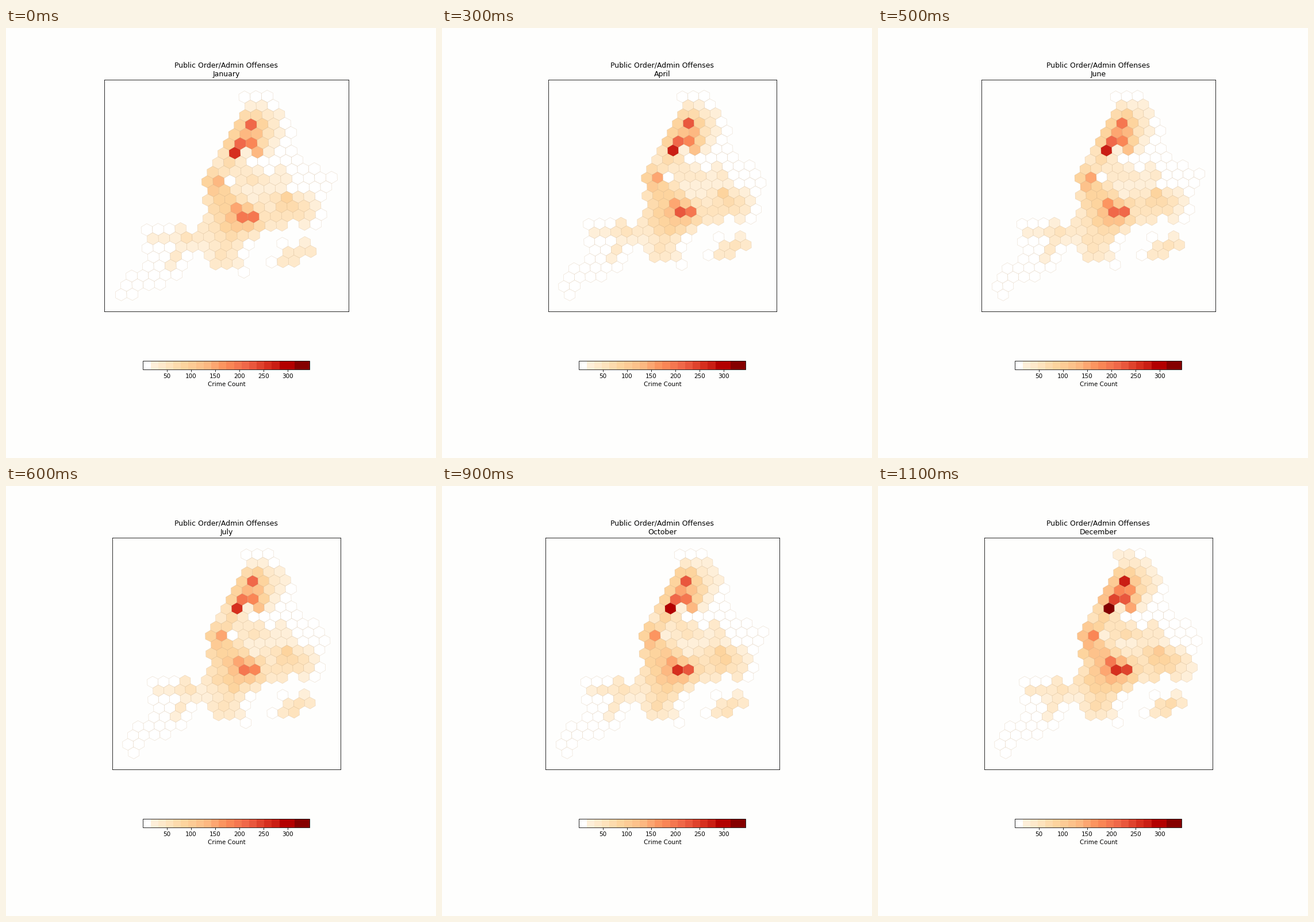
Animation, 748 px wide and 748 px high, one loop 1.2 s. Source, as a matplotlib script:

```python
import numpy as np
import matplotlib.pyplot as plt
from matplotlib.animation import FuncAnimation
from matplotlib.collections import PolyCollection
from matplotlib.colors import ListedColormap
from matplotlib.path import Path

MONTHS = ("January February March April May June July August "
          "September October November December").split()
PAPER = "#fefefd"

# Coastlines in lattice units (column, row)
MAINLAND = [(11.7, -.5), (12.2, 1), (8.2, 9), (8.2, 13.2), (6.7, 16.2),
            (8.2, 17), (8.7, 18.3), (11, 18.4), (11.2, 19.3), (11.8, 19.3),
            (11.8, 17), (12.9, 14.6), (15.4, 14.5), (16, 13.4), (16.6, 14.5),
            (18.3, 14.5), (18.9, 13), (18.9, 11), (19.3, 10), (18.9, 9),
            (18.4, 8), (16.7, 7), (16.3, 4), (14.3, -.5)]
ISLAND = [(2.7, 13.7), (6.3, 13.7), (6.8, 15), (6.8, 17.2), (5.7, 19.2),
          (4.3, 20.1), (1.9, 20.8), (1.2, 22.3), (.8, 22.3), (.3, 21),
          (1.2, 18.7), (2.7, 18.5)]
SPIT = [(14.7, 15.7), (15.3, 15.7), (15.6, 16.4), (16.4, 16.4), (16.7, 15.7),
        (17.3, 15.7), (17.9, 17.2), (16.5, 18.3), (13.6, 18.3), (14.7, 17)]
EAST_CAPE, SOUTH_CAPE = (19.5, 9), (1, 22)   # reported only in some months

# Density of reports: column, row, height, width
HILLS = [(12.5, 4, 95, 1.7), (9.5, 9.2, 100, 1.25), (12.7, 8.6, 55, 1),
         (10.6, 13.6, 95, 1.9), (15.9, 12, 72, 1.5), (9.5, 17.5, 35, .8),
         (16.8, 17.6, 65, .8), (6.2, 15, 50, .8),
         (14.8, 7, -60, 1.1), (16.7, 9.5, -40, .9)]
# Column, row, height
PEAKS = [(11, 6, 230), (11.5, 5, 115), (12.5, 5, 100), (12.5, 3, 135),
         (13, 6, 100), (9.5, 9, 65), (11, 12, 60), (11.5, 13, 115),
         (12.5, 13, 130), (15.5, 11, 30), (15.2, 8.4, 85), (4, 15, 45),
         (5.3, 17.5, 45), (15.2, 17.6, 45)]
HOLLOWS = [(12, 6, -95), (12.6, 7, -65), (10.5, 9, -85), (12.4, 10, -45),
           (12, 16.5, -40)]
BUMPS = np.array(HILLS + [(*p, .5) for p in PEAKS] + [(*h, .6) for h in HOLLOWS])

GRID = np.array([(col + row % 2 / 2, row) for row in range(23) for col in range(21)])
LAND = GRID[np.any([Path(coast).contains_points(GRID)
                    for coast in (MAINLAND, ISLAND, SPIT)], axis=0)]

CORNERS = np.array([(.5, 1/3), (0, 2/3), (-.5, 1/3),
                    (-.5, -1/3), (0, -2/3), (.5, -1/3)])


def hexagon(col, row):
    """Corners of one cell on the slightly turned lattice."""
    step = 18.95 - 0.012 * row
    k = col - 12
    centre = (418 + 0.43 * row + step * k,
              119 + 15.52 * row - 0.0085 * row**2 - 0.66 * k)
    return centre + CORNERS @ np.array([(step, -0.66), (0.43, 15.4)])


def month_cells(month):
    cells = LAND
    if month in (1, 9):
        cells = cells[np.any(cells != SOUTH_CAPE, axis=1)]
    if month in (1, 6, 10):
        cells = np.vstack([cells, EAST_CAPE])
    return cells


def month_counts(cells, month):
    """Sum of the bumps, rising slowly over the year with a jump at its end."""
    col, row, height, width = BUMPS.T
    dist2 = (cells[:, :1] - col)**2 + (0.82 * (cells[:, 1:] - row))**2
    density = (height * np.exp(-dist2 / (2 * width**2))).sum(axis=1)
    year = month / 12
    level = 0.92 + 0.1 * year + 0.2 * year**8
    jitter = np.random.default_rng(month).normal(1, 0.05, len(cells))
    return np.clip(density * level * jitter, 5, 345)


def padded(values):
    lo, hi = values.min(), values.max()
    pad = 0.05 * (hi - lo)
    return lo - pad, hi + pad


shades = plt.get_cmap("OrRd")((np.arange(22) + 0.5) / 22)
shades[0] = (1, 1, 1, 1)
shades[18:20, :3] = (0.70, 0, 0)
shades[20:, :3] = (0.52, 0, 0)

fig, ax = plt.subplots(figsize=(10, 10), dpi=74.8, facecolor=PAPER)
ax.set(facecolor=PAPER, xticks=[], yticks=[], aspect="equal")
tiles = PolyCollection([], cmap=ListedColormap(shades), linewidths=0.5,
                       edgecolors=[(0.72, 0.54, 0.32, 0.3)])
tiles.set_clim(1, 345)
ax.add_collection(tiles)
fig.colorbar(tiles, ax=ax, orientation="horizontal", shrink=0.5,
             label="Crime Count", ticks=range(50, 301, 50))


def update(i):
    cells = month_cells(i + 1)
    verts = np.array([hexagon(*cell) for cell in cells])
    tiles.set_verts(verts)
    tiles.set_array(month_counts(cells, i + 1))
    ax.set_xlim(padded(verts[..., 0]))
    ax.set_ylim(padded(verts[..., 1])[::-1])
    ax.set_title(f"Public Order/Admin Offenses\n{MONTHS[i]}", fontsize=12)
    return [tiles]


anim = FuncAnimation(fig, update, frames=12, interval=100,
                     init_func=lambda: update(0), repeat=True, repeat_delay=0)
plt.show()
```
